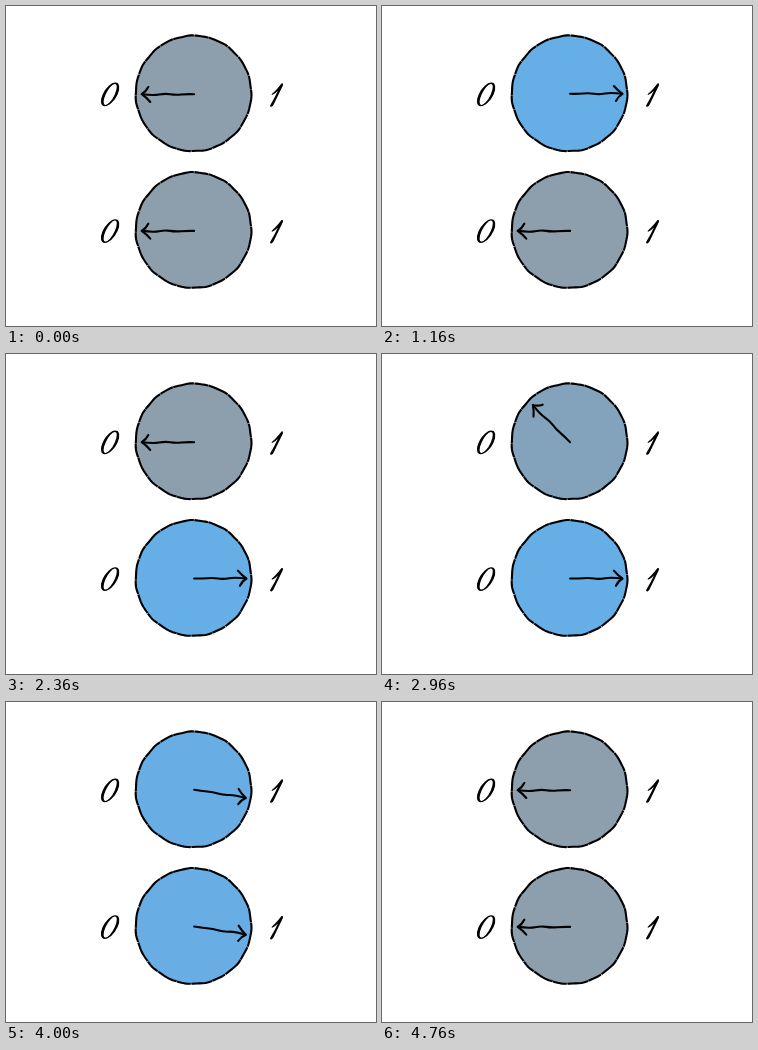
Recreate the animation shown at these times as an HTML page. Size 370x320 px, loop 4800 ms.

```html
<!DOCTYPE html>
<html lang="en">
<head>
<meta charset="utf-8">
<title>Two-bit counter</title>
<style>
  html, body { margin: 0; width: 100%; height: 100%; overflow: hidden; background: #fff; }
  svg { display: block; }
  .ink { fill: none; stroke: #000; stroke-width: 2.1; stroke-linecap: round; stroke-linejoin: round; }
  .rim { stroke-linecap: butt; stroke-dasharray: 21 .6 14 .4; }
  .digit { fill: #000; fill-rule: evenodd; }
</style>
</head>
<body>
<svg width="370" height="320" viewBox="0 0 370 320" role="img" aria-label="Two dials turning between 0 and 1">
  <defs>
    <path id="zero" class="digit" transform="skewX(-24)"
      d="M-7.5 0a7.5 11.9 0 0 1 15 0a7.5 11.9 0 0 1 -15 0z
         M-4.5 0a4.6 10.5 0 0 0 9.2 0a4.6 10.5 0 0 0 -9.2 0z"/>
    <path id="one" class="digit"
      d="M6 -11.4Q3.4 -8 1 -5.4T-4 -.6Q-3.6 .4 -2.4 -.2Q.4 -1.8 2.4 -4
         Q-1 3.4 -5.4 10.6Q-5.6 12.2 -4 12Q-2.6 11.4 -1.8 9.6L7.4 -9.4Q8.2 -11.8 6 -11.4z"/>
    <g id="arrow" class="ink">
      <path d="M0 .2Q-7 0 -13 .5T-24 .2T-35 .5T-52 .2"/>
      <path d="M-45.8 -7Q-48 -2.4 -52.4 .2Q-47.6 3.4 -43.8 8"/>
    </g>
  </defs>
</svg>
<script>
const PERIOD = 4800, BEAT = 1200, TURN = 800, FRAME = 40;
const OFF = [141, 158, 173], ON = [102, 174, 230];
const svg = document.querySelector('svg');

function add(parent, tag, attrs) {
  const el = document.createElementNS('http://www.w3.org/2000/svg', tag);
  for (const key in attrs) el.setAttribute(key, attrs[key]);
  return parent.appendChild(el);
}

// A circle with a slight hand-drawn wobble.
function wobblyCircle(radius) {
  const points = [];
  for (let i = 0; i < 120; i++) {
    const a = i * Math.PI / 60;
    const r = radius + .2 * Math.sin(19 * a + 1) + .15 * Math.sin(11 * a);
    points.push((r * Math.cos(a)).toFixed(2) + ' ' + (r * Math.sin(a)).toFixed(2));
  }
  return 'M' + points.join('L') + 'z';
}

function makeDial(y) {
  const g = add(svg, 'g', { transform: `translate(187.5 ${y})` });
  const outline = wobblyCircle(57.8);
  const face = add(g, 'path', { d: outline });
  add(g, 'path', { d: outline, class: 'ink rim' });
  add(g, 'use', { href: '#zero', transform: 'translate(-83.4 1)' });
  add(g, 'use', { href: '#one', transform: 'translate(82 1.4)' });
  const arrow = add(g, 'use', { href: '#arrow' });
  return halfTurns => {
    const on = halfTurns <= 1 ? halfTurns : 2 - halfTurns;
    const rgb = OFF.map((c, i) => Math.round(c + (ON[i] - c) * on));
    face.setAttribute('fill', `rgb(${rgb})`);
    arrow.setAttribute('transform', `translate(.6 .6) rotate(${180 * halfTurns})`);
  };
}

const low = makeDial(87.4), high = makeDial(224.1);

// Each turn is linear and ends one frame before its beat does.
function turn(t, beat) {
  const end = beat * BEAT - FRAME;
  return Math.min(1, Math.max(0, 1 - (end - t) / TURN));
}

function draw(now) {
  const t = Math.floor(now % PERIOD / FRAME) * FRAME;
  const [a, b, c, d] = [1, 2, 3, 4].map(beat => turn(t, beat));
  low((a + b + c + d) % 2);
  high(b + d);
  requestAnimationFrame(draw);
}
draw(performance.now());
</script>
</body>
</html>
```
